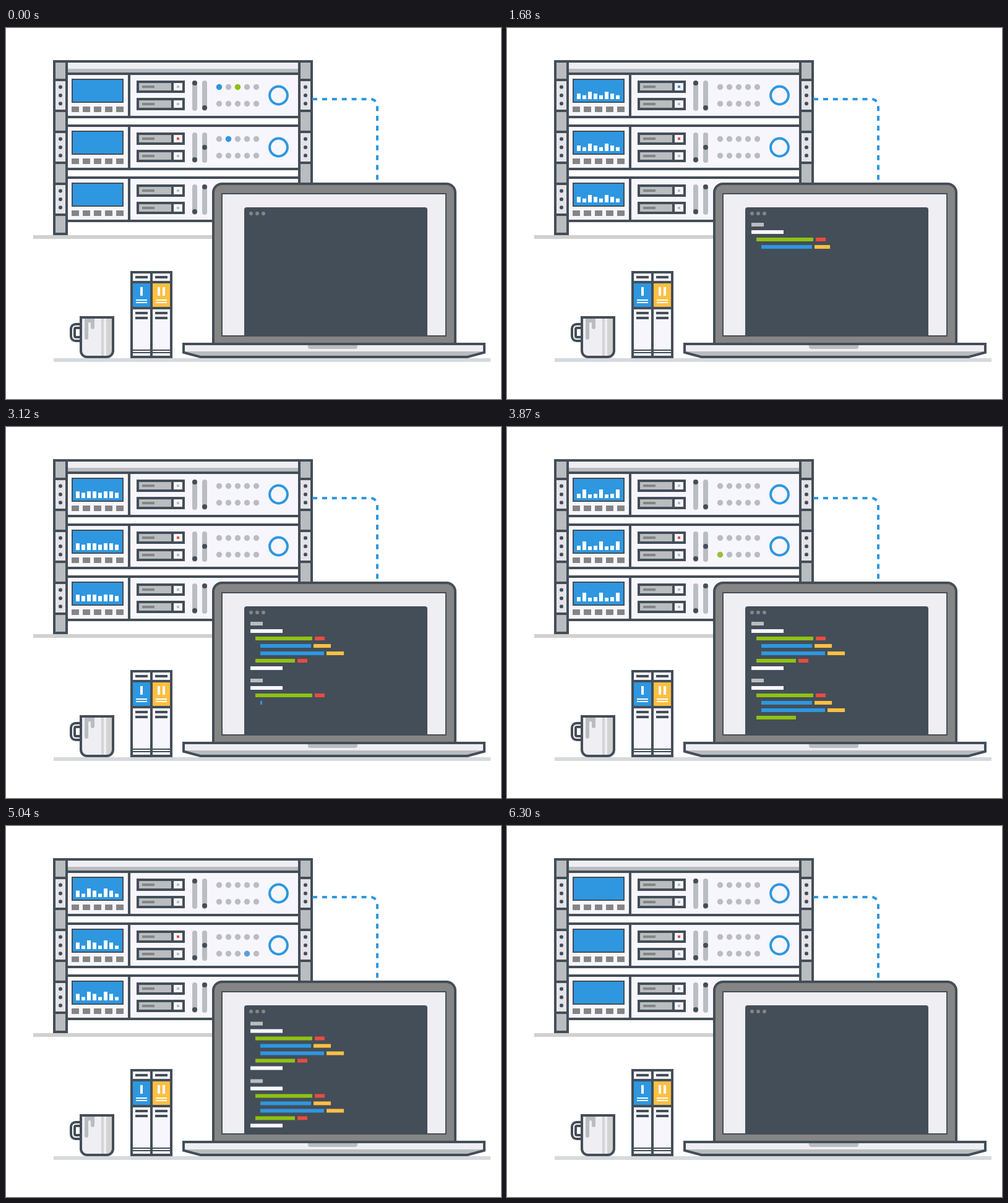
Write an HTML page with a canvas that moves like this. It is 800 px wide and 600 px high and loops after 6.39 s.

```html
<!DOCTYPE html>
<html lang="en">
<head>
<meta charset="utf-8">
<title>Server rack and laptop</title>
<style>
html, body { margin: 0; width: 100%; height: 100%; overflow: hidden; background: #fff; }
canvas { display: block; }
</style>
</head>
<body>
<canvas id="stage" width="800" height="600"></canvas>
<script>
const ctx = document.getElementById('stage').getContext('2d');
const LOOP = 6390, STEP = 30;
const INK = '#444e58', BLUE = '#2e97e0', GREY = '#b9bdc0', DIM = '#858585', PALE = '#f7f6fd',
  SOFT = '#efeef3', GREEN = '#8fc212', RED = '#ea4b40', GOLD = '#fdbf43', WHITE = '#fff';

function rect(x, y, w, h, color) {
  ctx.fillStyle = color;
  ctx.fillRect(x, y, w, h);
}
function paint(fill, line, width) {
  if (fill) { ctx.fillStyle = fill; ctx.fill(); }
  if (line) { ctx.strokeStyle = line; ctx.lineWidth = width; ctx.stroke(); }
}
function box(x, y, w, h, r, fill, line, width = 4) {
  ctx.beginPath();
  ctx.roundRect(x, y, w, h, r);
  paint(fill, line, width);
}
function disc(x, y, r, fill, line, width = 4) {
  ctx.beginPath();
  ctx.arc(x, y, r, 0, 7);
  paint(fill, line, width);
}

const clamp = v => Math.max(0, Math.min(1, v));
const easeInOut = p => p < 0.5 ? 2 * p * p : 1 - 2 * (1 - p) ** 2;
const easeInBack = (p, s) => p * p * ((s + 1) * p - s);

// Heights of three bars at key times; the eight bars repeat them
const KEYS = [
  [0, 0, 0, 0], [1020, 3, 9.5, 7.5], [2340, 15, 3, 16.5], [3870, 7, 14, 6],
  [5040, 10.5, 5.5, 14], [5340, 5.5, 11, 3], [6270, 0, 0, 0], [LOOP, 0, 0, 0]
];
function barHeight(i, t) {
  const k = KEYS.findIndex(key => key[0] > t), a = KEYS[k - 1], b = KEYS[k];
  const p = easeInOut((t - a[0]) / (b[0] - a[0])), track = 1 + i % 3;
  return a[track] + (b[track] - a[track]) * p;
}

// Blinking lights: number (ten per server), peak time, colour
const BLINKS = [
  [0, 0, BLUE], [2, 0, GREEN], [11, 0, BLUE], [9, 400, GREEN],
  [0, 920, BLUE], [15, 3815, GREEN], [18, 4965, BLUE], [18, 5465, BLUE]
];
const FADE = 250;

function light(n, color) {
  disc(344.5 + n % 5 * 15, 95.5 + Math.floor(n / 5) * 27, 4.7, color);
}

function post(x) {
  box(x, 54, 20, 279, 0, GREY, INK);
  for (let y = 84; y < 300; y += 84) {
    box(x, y, 20, 50, 0, '#e4e4e8', INK);
    for (let i = 0; i < 3; i++) disc(x + 10, y + 11.5 + i * 13.4, 3, INK);
  }
}

function drive(y, led) {
  box(213, y + 2, 74, 16, 0, GREY, INK);
  rect(220, y + 8, 20, 4, DIM);
  rect(267, y + 4, 4, 12, INK);
  rect(271, y + 4, 14, 12, PALE);
  rect(276, y + 8, 4, 4, led);
}

function server(n, t) {
  ctx.save();
  ctx.translate(0, n * 84);
  box(98, 74, 376, 70, 0, PALE, INK);
  rect(197, 74, 4, 70, INK);
  box(107, 83, 82, 37, 0, BLUE, INK, 2);
  const floor = n === 2 ? 114 : 115;
  for (let i = 0; i < 8; i++) {
    const h = barHeight(i, t);
    rect(113 + i * 9, floor - h, 6, h, WHITE);
  }
  for (let i = 0; i < 5; i++) rect(106 + i * 18, 127, 12, 9, DIM);

  drive(85, [t > 840 && t < 3000 ? BLUE : GREY, RED, GREY][n]);
  drive(113, n === 2 && t > 240 && t < 600 ? GREEN : GREY);

  const knobs = [[89, 129], [129, 109], [129, 89]][n];
  knobs.forEach((y, i) => {
    box(301 + i * 16, 85, 8, 49, 4, GREY);
    disc(305 + i * 16, y, 4, INK);
  });

  for (let i = 0; i < 10; i++) light(i, GREY);
  for (const [id, peak, color] of BLINKS) {
    if (Math.floor(id / 10) !== n) continue;
    ctx.globalAlpha = clamp(1 - Math.abs(t - peak) / FADE);
    light(id % 10, color);
  }
  ctx.globalAlpha = 1;
  disc(440.5, 109, 14.4, PALE, BLUE);
  ctx.restore();
}

function rack(t) {
  rect(44, 335, 300, 6, '#d0d0d0');
  box(98, 54, 376, 20, 0, SOFT, INK);
  rect(100, 66, 372, 6, GREY);
  for (let n = 0; n < 3; n++) server(n, t);
  post(78);
  post(474);
}

function cable() {
  ctx.beginPath();
  ctx.moveTo(495, 115);
  ctx.lineTo(589, 115);
  ctx.arcTo(600, 115, 600, 126, 11);
  ctx.lineTo(600, 252);
  ctx.setLineDash([8, 7.9]);
  paint(null, BLUE, 4);
  ctx.setLineDash([]);
}

// Lines of code as [indent, width]; the indent sets the colours and the tail
const LINES = [[0, 20], [0, 52], [1, 92], [2, 82], [2, 103], [1, 64], [0, 52]];
const STYLES = [[PALE], [GREEN, RED, 16], [BLUE, GOLD, 28]];
const TYPE_START = 790, TYPE = 154;

function code(t) {
  let begin = TYPE_START;
  const type = (x, y, w, color) => {
    rect(x, y, Math.round(w * easeInOut(clamp((t - begin) / TYPE))), 6, color);
    begin += TYPE;
  };
  ctx.save();
  ctx.beginPath();
  ctx.rect(385, 290, 296, 207);
  ctx.clip();
  for (let copy = 0; copy < 2; copy++) {
    // The lower block leaves slightly ahead of the upper one
    const lift = 226 * easeInBack(clamp((t - 5014 + copy * 8) / 300), 1.1);
    LINES.forEach(([indent, width], row) => {
      if (copy && row === LINES.length) return;
      const x = 395 + indent * 8, y = 315 + copy * 92 + row * 12 - lift;
      const [head, tail, tailWidth] = STYLES[indent];
      type(x, y, width, row ? head : GREY);
      if (tail) type(x + width + 4, y, tailWidth, tail);
    });
  }
  ctx.restore();
}

function laptop(t) {
  box(335, 252, 391, 270, [14, 14, 0, 0], DIM, INK);
  box(349, 268, 362, 230, 0, SOFT, INK, 2);
  box(385, 290, 296, 208, [4, 4, 0, 0], INK);
  if (t < 5310) code(t);
  for (let i = 0; i < 3; i++) disc(396 + i * 10, 300, 3, DIM);

  const base = new Path2D('M287 511H773V524.6L746 532H314L287 524.6Z');
  ctx.save();
  ctx.clip(base);
  rect(285, 509, 490, 14, SOFT);
  rect(285, 523, 490, 10, GREY);
  ctx.restore();
  box(488, 511, 80, 8, [0, 0, 4, 4], GREY);
  ctx.strokeStyle = INK;
  ctx.lineWidth = 4;
  ctx.stroke(base);
}

function book(x, color, marks) {
  box(x, 395, 32, 137, 0, PALE, INK);
  box(x, 411, 32, 42, 0, color, INK);
  for (const y of [401, 459, 467]) rect(x + 6, y, 20, 4, INK);
  for (const m of marks) rect(x + m, 419, 4, 14, WHITE);
  for (const y of [439, 443]) rect(x + 7, y, 18, 2, WHITE);
  for (const y of [520, 524]) rect(x, y, 32, 2, INK);
}

function mug() {
  box(105, 479, 24, 27, 7.5, WHITE, INK);
  box(111, 485, 18, 15, 2, WHITE, INK);
  box(121, 468, 52, 64, [0, 0, 10, 10], SOFT);
  rect(154, 470, 4, 61, '#d3d3d5');
  box(162, 470, 10, 61, [0, 0, 9, 0], '#d3d3d3');
  rect(127, 470, 16, 9, GREY);
  box(127, 470, 6, 34, [0, 0, 3, 3], GREY);
  box(137, 470, 6, 17, [0, 0, 3, 3], GREY);
  box(133, 476, 4, 6, [2, 2, 0, 0], SOFT);
  box(121, 468, 52, 64, [0, 0, 10, 10], null, INK);
}

function draw(t) {
  rect(0, 0, 800, 600, WHITE);
  rack(t);
  cable();
  rect(77, 534, 706, 6, '#d5dade');
  laptop(t);
  book(203, BLUE, [14]);
  book(235, GOLD, [10, 18]);
  mug();
}

const start = performance.now();
function frame() {
  const t = (performance.now() - start) % LOOP;
  draw(Math.min(6300, Math.floor(t / STEP) * STEP));
  requestAnimationFrame(frame);
}
frame();
</script>
</body>
</html>
```
